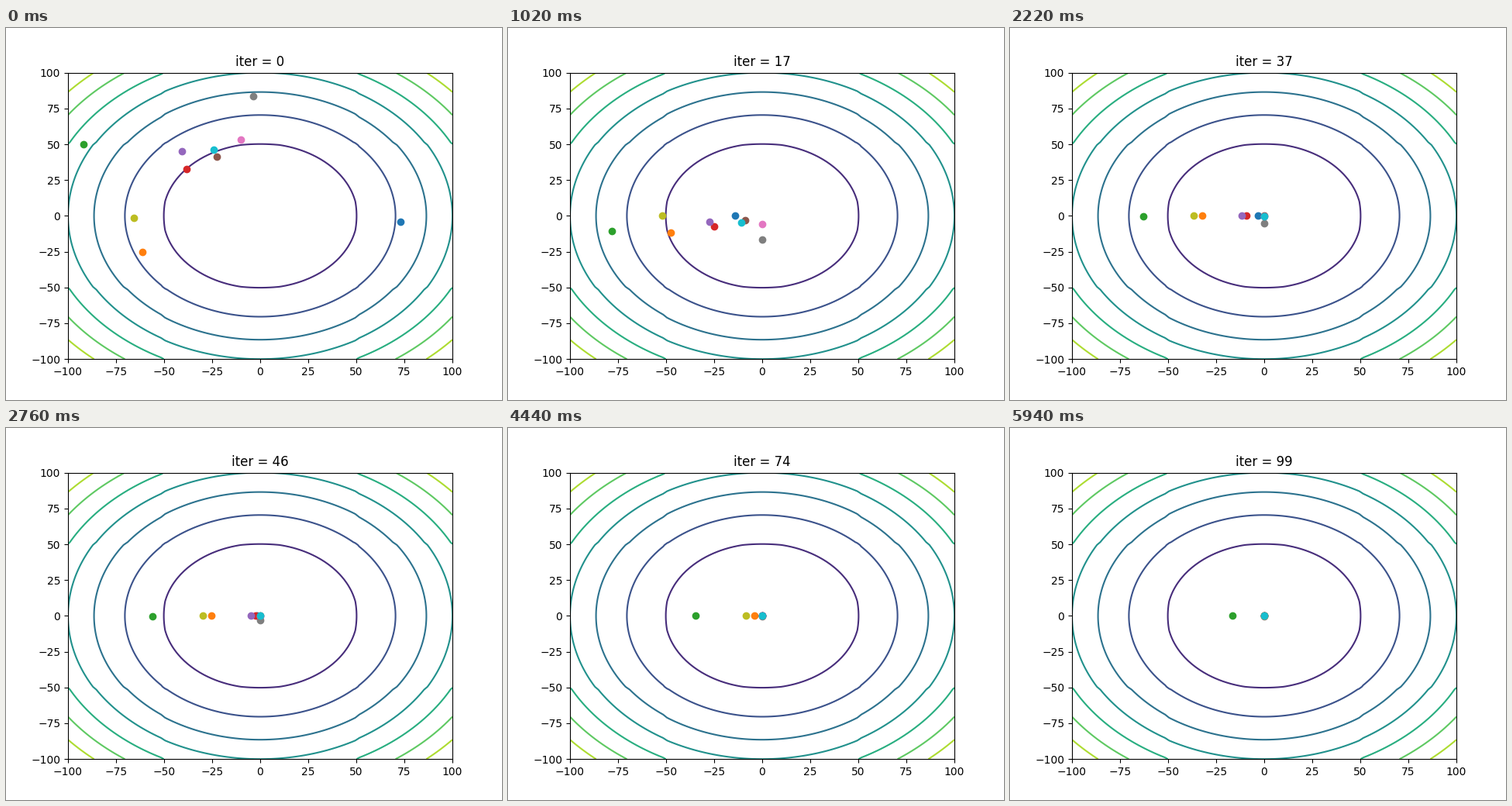
Animation, 640 px wide and 480 px high, one loop 6 s. Source, as a matplotlib script:

```python
import numpy as np
import matplotlib.pyplot as plt
from matplotlib.animation import FuncAnimation

FRAMES = 100
STEP = 60
LAND = 6  # iteration at which a falling coordinate turns round

# Start x, start y, and how deep the positive coordinate swings below zero.
PARTICLES = (
    (73, -4, 22.7),
    (-61.2, -25.2, 0),
    (-91.8, 50, 19.2),
    (-38.5, 32.6, 16.2),
    (-40.8, 45, 12.8),
    (-22.5, 41.3, 11.8),
    (-10, 53, 14.4),
    (-3.5, 83.4, 25.2),
    (-65.6, -1.5, 0),
    (-24.3, 46, 13.2),
)


def path(start, dip):
    """Fall freely from a positive start, then climb to zero at limited speed."""
    values = [start]
    pull = min(1, (20 / start) ** 2) if start > 0 else 1
    for n in range(1, FRAMES):
        if start > 0 and n <= LAND:
            s = n / LAND
            values.append(start - (start + dip) * s * s * (3 - 2 * s))
        else:
            top_speed = 0.8 * (1 - n / 1000)
            values.append(values[-1] + min(top_speed, -pull * values[-1]))
    return values


tracks = [(path(x, dip), path(y, dip)) for x, y, dip in PARTICLES]

fig, ax = plt.subplots(figsize=(6.4, 4.8), dpi=100)
grid = np.linspace(-100, 100, 100)
gx, gy = np.meshgrid(grid, grid)
# The cost is evaluated on whole-number coordinates.
ax.contour(gx, gy, np.rint(gx) ** 2 + np.rint(gy) ** 2,
           levels=np.arange(2500, 17501, 2500),
           cmap="viridis", vmin=0, vmax=20000)
ax.set_xlim(-100, 100)
ax.set_ylim(-100, 100)
title = ax.set_title("iter = 0")
dots = [ax.plot([], [], "o", color=f"C{i}", zorder=3)[0]
        for i in range(len(PARTICLES))]


def update(n):
    title.set_text(f"iter = {n}")
    for dot, (xs, ys) in zip(dots, tracks):
        dot.set_data([xs[n]], [ys[n]])
    return [title, *dots]


anim = FuncAnimation(fig, update, frames=FRAMES, init_func=lambda: update(0),
                     interval=STEP, repeat=True, repeat_delay=0, blit=False)
plt.show()
```
